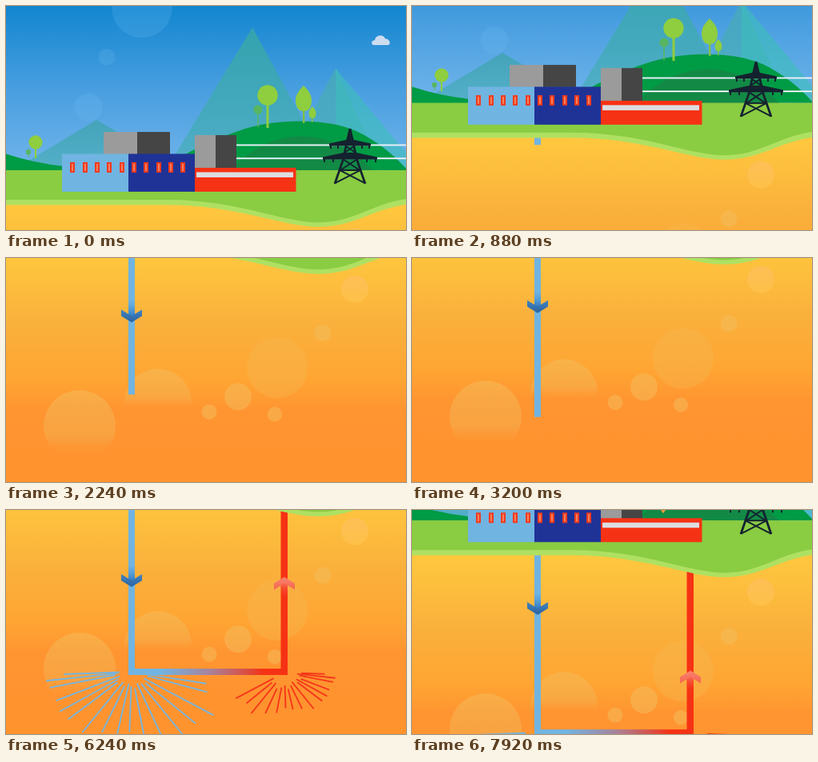
Write an HTML page with a canvas that moves like this. It is 500 px wide and 281 px high and loops after 8 s.

```html
<!DOCTYPE html>
<html lang="en">
<head>
<meta charset="utf-8">
<title>Geothermal plant</title>
<style>
  html, body { margin: 0; width: 100%; height: 100%; overflow: hidden; background: #ff9430; }
  canvas { display: block; width: 100vw; height: 100vh; }
</style>
</head>
<body>
<canvas id="stage" width="500" height="281"></canvas>
<script>
const ctx = document.getElementById('stage').getContext('2d');
const W = 500, LOOP = 8000, DEPTH = 269;
const BLUE = '#70b4e2', RED = '#f63214', GREEN = '#8acc42', HILL = '#009b45', STEEL = '#14222f';

const clamp = v => Math.max(0, Math.min(1, v));
const span = (t, a, b) => clamp((t - a) / (b - a));
const sine = p => (1 - Math.cos(Math.PI * p)) / 2;

// Camera keys: time, position, speed
const CAM = [[0, 0, .03], [880, 84, .143], [1600, 190, .135], [2240, 257, .066], [2740, DEPTH, 0]];

function camera(t) {
  if (t > 6920) return DEPTH * (1 - sine(span(t, 6920, 9720)));
  for (let i = 1; i < CAM.length; i++) {
    const [t0, y0, v0] = CAM[i - 1], [t1, y1, v1] = CAM[i];
    if (t > t1) continue;
    const d = t1 - t0, u = (t - t0) / d, w = 1 - u;
    return (1 + 2 * u) * w * w * y0 + u * w * w * d * v0 + u * u * (3 - 2 * u) * y1 - u * u * w * d * v1;
  }
  return DEPTH;
}

function rect(x, y, w, h, fill) {
  ctx.fillStyle = fill;
  ctx.fillRect(x, y, w, h);
}

function disc(x, y, r, fill) {
  ctx.fillStyle = fill;
  ctx.beginPath();
  ctx.arc(x, y, r, 0, 7);
  ctx.fill();
}

function poly(fill, ...p) {
  ctx.fillStyle = fill;
  ctx.beginPath();
  for (let i = 0; i < p.length; i += 2) ctx.lineTo(p[i], p[i + 1]);
  ctx.fill();
}

function shape(fill, d) {
  ctx.fillStyle = fill;
  ctx.fill(new Path2D(d));
}

function lines(d, color, width) {
  ctx.strokeStyle = color;
  ctx.lineWidth = width;
  ctx.stroke(new Path2D(d));
}

function grad(x0, y0, x1, y1, ...stops) {
  const g = ctx.createLinearGradient(x0, y0, x1, y1);
  for (let i = 0; i < stops.length; i += 2) g.addColorStop(stops[i], stops[i + 1]);
  return g;
}

function sky() {
  rect(0, -5, W, 260, grad(0, 0, 0, 215, 0, '#1286d0', .5, '#4a9fe0', 1, '#74b6ec'));
  const pale = 'rgba(110,185,240,.22)';
  disc(170, 2, 38, pale);
  disc(126, 64, 10.5, pale);
  disc(103, 127, 17.5, pale);
  shape('#cbdcef', 'M460 49C456 49 456 43 461 43C462 36 472 35 474 41C480 41 482 49 477 49Z');

  const slope = (y, c) => grad(0, y, 0, 205, 0, c, 1, 'rgba(75,175,190,.75)');
  poly(slope(143, '#45a3b9'), 113, 143, 18, 200, 18, 210, 222, 210, 212, 200);
  poly(slope(27, '#35a3ae'), 308, 27, 200, 205, 405, 205);
  poly(slope(80, '#47a6c0'), 412, 78, 345, 205, 470, 205);
  poly('rgba(62,190,190,.65)', 412, 78, 412, 150, 440, 205, 505, 205, 505, 190);
}

function leaf(x, top, w, h) {
  const y = top + h * .55, b = top + h, r = w / 2;
  shape('#8fce3e', `M${x} ${top}Q${x + r} ${top + h * .3} ${x + r} ${y}Q${x + r} ${b} ${x} ${b}` +
    `Q${x - r} ${b} ${x - r} ${y}Q${x - r} ${top + h * .3} ${x} ${top}`);
}

function tree(x, y, r, foot, trunk, color = '#8fce3e') {
  rect(x - trunk / 2, y, trunk, foot - y, color);
  disc(x, y, r, color);
}

function land() {
  shape(HILL, 'M0 185.500Q35 197 72 201L160 209H0Z');
  shape(HILL, 'M190 205C230 182 258 168 290 157C335 140.500 401 140.500 438 157C465 170 485 187 502 206Z');
  shape('#128a45', 'M280 207C310 174 340 164 370 163.500C400 164 430 176 460 207Z');

  tree(315, 130, 5.6, 152, 1.6, '#58b660');
  tree(327, 112, 12.7, 153, 3);
  rect(371, 120, 2.4, 27, '#7fc043');
  leaf(372, 100, 20, 32);
  rect(382, 133, 1.4, 13, '#7fc043');
  leaf(383, 126, 9, 15);
  tree(37, 171, 8.6, 191, 2.2);
  tree(28, 183, 3.2, 190, 1.2, '#58b660');
}

const shore = (y, dip, end) =>
  `M0 ${y}H200C290 ${y} 345 ${dip} 390 ${dip}C435 ${dip} 455 ${end + 7} 500 ${end}V206H0Z`;

function ground() {
  rect(0, 240, W, 340, grad(0, 250, 0, 540, 0, '#ffc83e', .32, '#fab03c', .55, '#ffa533', .68, '#ff9531', 1, '#ff932e'));
  const glow = 'rgba(243,190,92,.5)';
  const fade = (top, end) => grad(0, top, 0, end, 0, glow, .75, 'rgba(240,182,88,.4)', 1, 'rgba(243,170,80,0)');
  disc(436, 296, 17, grad(0, 279, 0, 313, 0, 'rgba(255,190,100,.65)', 1, 'rgba(255,198,80,.6)'));
  disc(396, 351, 10.5, glow);
  disc(339, 395, 38, 'rgba(243,182,82,.36)');
  disc(290, 431, 17, glow);
  disc(254, 450, 9.5, glow);
  disc(336, 453, 9.2, glow);
  disc(190, 438, 42, fade(396, 444));
  disc(92, 468, 45, fade(423, 500));
}

function surface() {
  shape('#aee062', shore(249.5, 277, 249));
  shape(GREEN, shore(243, 271.5, 242));
}

function plant() {
  rect(122, 158, 42, 28, '#9b9b9b');
  rect(164, 158, 41, 28, '#454545');
  rect(236, 162, 26, 42, '#9b9b9b');
  rect(262, 162, 26, 42, '#454545');
  rect(70, 185.5, 83, 47.5, BLUE);
  rect(153, 185.5, 83, 47.5, '#1f3397');
  rect(236, 203, 126.5, 30, RED);
  rect(238, 208.5, 121, 6.5, '#dcdde0');
  for (let i = 0; i < 10; i++) {
    const x = Math.round(80.3 + i * 15.35);
    rect(x, 196, 6, 13, '#f23a1e');
    rect(x + 2, 198, 2, 9, '#f5805c');
  }
}

function pylon() {
  for (const y of [173.5, 190.2]) rect(288, y, 212, 2, '#e4eff6');
  for (const s of [-1, 1]) {
    const x = d => 430 + s * d;
    lines(`M430 154L${x(9)} 194L${x(19)} 223`, STEEL, 2.8);
    poly(STEEL, 430, 160, x(5), 168, x(26), 172.5, x(26), 175.5, 430, 175.5);
    poly(STEEL, 430, 184, x(8), 184, x(34), 189.500, x(34), 192.5, 430, 192.5);
    for (const [d, y] of [[24, 175], [15, 175], [32, 192], [21, 192]]) rect(x(d) - 1, y, 2, 4, STEEL);
    lines(`M${x(6)} 175L${x(-8)} 185M${x(9)} 192L${x(-12)} 206M${x(13)} 206L${x(-18)} 222`, STEEL, 2);
  }
  lines('M417 206H443', STEEL, 2);
}

// Ray angle in degrees and reach
const RAYS = [[9, 58], [15, 60], [28, 71], [39, 63], [51, 68], [65, 58], [79, 53], [92, 46], [103, 49],
  [116, 52], [129, 60], [143, 61], [151, 63], [159, 62], [169, 64], [174, 66], [178, 52]];

function spray(rays, x, y, size, dir, color) {
  if (size <= 0) return;
  ctx.strokeStyle = color;
  ctx.lineWidth = 1.9;
  ctx.beginPath();
  rays.forEach(([deg, reach], i) => {
    const a = deg * Math.PI / 180, c = Math.cos(a) * dir, s = Math.sin(a);
    const end = reach * size, start = Math.min(end, 15 + i * 5 % 8);
    ctx.moveTo(x + c * start, y + s * start);
    ctx.lineTo(x + c * end, y + s * end);
  });
  ctx.stroke();
}

// dir 1 points down, -1 points up
function arrow(x, tip, dir, alpha, stem, clear, inner, outer) {
  ctx.save();
  ctx.globalAlpha = alpha;
  ctx.translate(x, tip);
  ctx.scale(1, dir);
  rect(-4, -28, 8, 24, grad(0, -28, 0, -6, 0, clear, 1, stem));
  poly(grad(0, -16, 0, 0, 0, inner, 1, outer), -13, -16, 0, -8, 13, -16, 13, -8, 0, 0, -13, -8);
  ctx.restore();
}

function flow(t, start, draw) {
  if (t < start) return;
  const age = (t - start) % 960;
  draw(age * .172, Math.min(span(age, 0, 110), 1 - span(age, 850, 960)));
}

function pipes(t) {
  const growth = (start, full) => Math.pow(Math.max(0, t - start) / (full - start), .6);
  spray(RAYS, 157, 472, growth(3080, 4480), 1, '#78b4dc');
  spray(RAYS.slice(2), 348, 473, growth(5100, 6300), -1, '#f5381a');

  if (t > 810) rect(153, 249.5, 8, Math.min(219, (t - 810) * .125), BLUE);

  const across = span(t, 4490, 5150);
  if (across) {
    rect(153, 468, 199 * across, 8, grad(153, 0, 352, 0, 0, BLUE, .2, BLUE, .5, '#a5859f', .75, '#dc4c40', .85, RED));
  }
  const up = span(t, 5150, 5850);
  if (up) {
    const top = 476 - 206 * up;
    poly(RED, 343.5, top - 1, 352, top + 2, 352, 476, 343.5, 476);
  }
  flow(t, 1660, (d, a) =>
    arrow(157, 238 + d, 1, a, '#2a73bd', 'rgba(70,150,215,0)', '#4383bd', '#2a64a4'));
  flow(t, 5720, (d, a) =>
    arrow(348, 442.5 - d, -1, a, '#f77762', 'rgba(246,50,20,0)', '#f5654e', '#f98470'));
}

function draw(t) {
  ctx.setTransform(1, 0, 0, 1, 0, -camera(t));
  sky();
  land();
  ground();
  pipes(t);
  surface();
  pylon();
  plant();
  if (t > 7000) poly('#f59a3c', 309, 190, 319, 190, 314, 197);
}

function tick(now) {
  draw(now % LOOP);
  requestAnimationFrame(tick);
}
requestAnimationFrame(tick);
</script>
</body>
</html>
```
